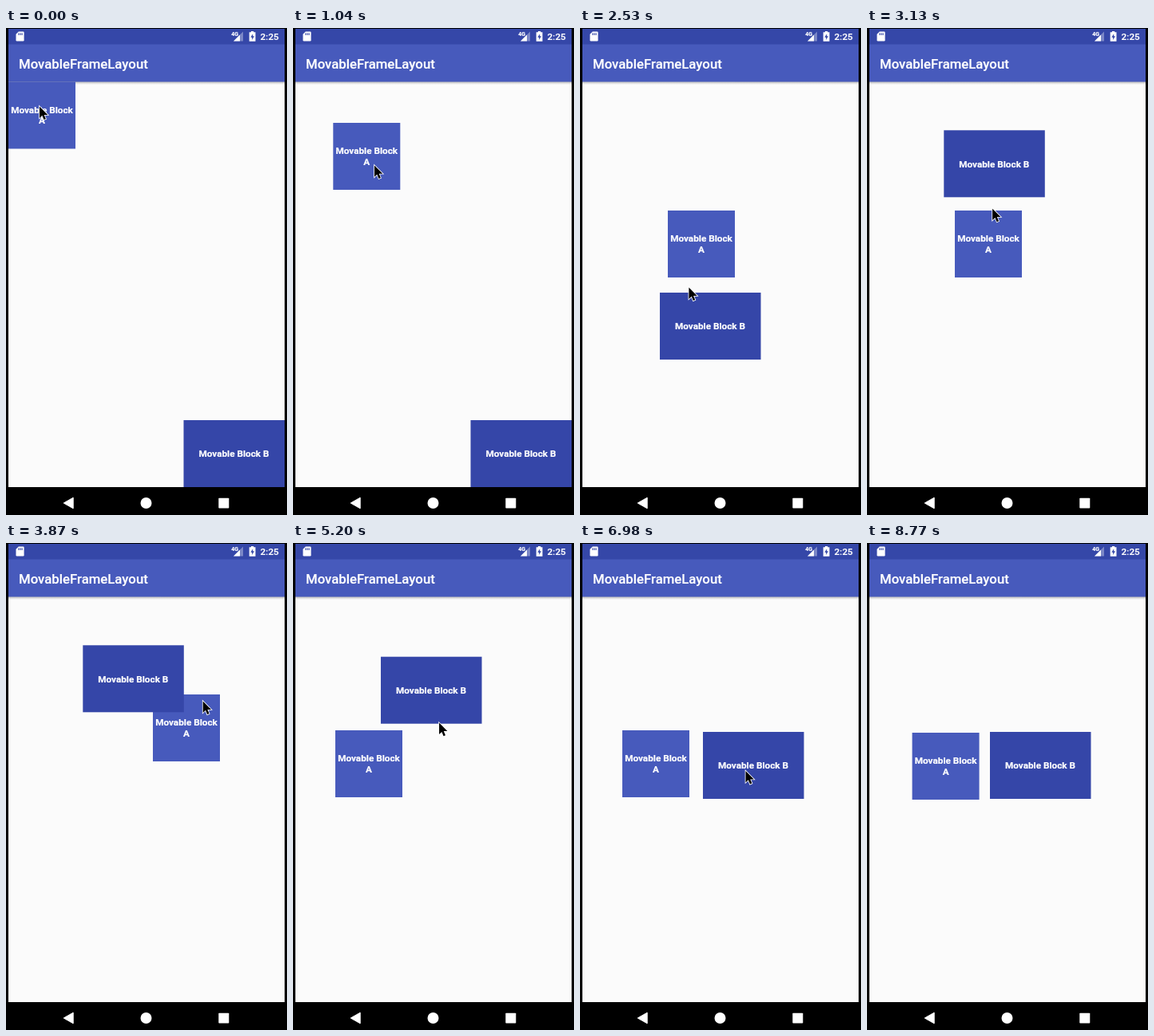
An HTML page that plays this animation: 352 by 611 pixels, repeating every 9.07 s.

```html
<!DOCTYPE html>
<html lang="en">
<head>
<meta charset="utf-8">
<title>MovableFrameLayout</title>
<style>
  html, body { margin: 0; width: 100%; height: 100%; overflow: hidden; background: #000; }
  svg { display: block; width: 352px; height: 611px; }
  text { font: 500 11.75px Roboto, sans-serif; fill: #fff; stroke: #fff; stroke-width: .2px; }
  .title { font-size: 16.75px; }
  .signal { font-size: 7px; font-weight: 700; }
  .label { font-weight: 700; text-anchor: middle; }
</style>
</head>
<body>
<svg viewBox="0 0 352 611">
  <defs>
    <linearGradient id="shade" x2="0" y2="1">
      <stop offset="0" stop-color="#000" stop-opacity=".28"/>
      <stop offset="1" stop-color="#000" stop-opacity="0"/>
    </linearGradient>
  </defs>

  <rect width="352" height="611"/>
  <rect x="3" y="1" width="346" height="575" fill="#fbfbfb"/>
  <rect x="3" y="67" width="346" height="4" fill="url(#shade)"/>
  <rect x="3" y="20" width="346" height="47.5" fill="#475abc"/>
  <rect x="3" y="1" width="346" height="19.5" fill="#3547a8"/>
  <text class="title" x="16" y="51">MovableFrameLayout</text>

  <g fill="#fff">
    <path d="M15.8 4.5H21.4Q22.6 4.5 22.6 5.7V15.3Q22.6 16.5 21.4 16.5H13.7Q12.5 16.5 12.5 15.3V7.8Z"/>
    <path d="M15.9 6.3v2.6M18 6.3v2.6M20.1 6.3v2.6" stroke="#3547a8" stroke-width="1.1"/>
    <text class="signal" x="282.3" y="10.3">4G</text>
    <path d="M297 4.5V16.5H285Z" opacity=".35"/>
    <path d="M293 8.5V16.5H285Z"/>
    <path d="M307 4h3.2v1.3h2.3v11.4h-7.8V5.3H307Z"/>
    <path d="M309.2 7.2l-2.8 4.6h1.8v3.2l2.8-4.7h-1.8Z" fill="#3547a8"/>
    <text x="318.6" y="15.3">2:25</text>
    <path d="M72.2 596L84.2 589.2V602.8Z" stroke="#fff" stroke-linejoin="round"/>
    <circle cx="175.5" cy="596" r="7"/>
    <rect x="266.3" y="589.8" width="13" height="12.8" rx=".8"/>
  </g>

  <g id="A">
    <rect width="84" height="84" fill="#475abc"/>
    <text class="label" x="42" y="39.2">Movable Block</text>
    <text class="label" x="42" y="52.8">A</text>
  </g>
  <g id="B">
    <rect width="126.5" height="84" fill="#3546a8"/>
    <text class="label" x="63" y="46.4">Movable Block B</text>
  </g>
  <path id="cursor" d="M0 0V14.4L3.3 11.3 5.5 16.6 7.9 15.6 5.7 10.4H10.3Z"
    stroke="#fff" stroke-width="1.6" paint-order="stroke"/>
</svg>
<script>
const LOOP = 9070, TICK = 148.65, LAST = 59;
const LEAD = 0.75;       // ticks by which the pointer runs ahead of its block
const GLIDE = 3;         // ticks the pointer takes to reach the next block
const EXIT = [330, 640];

const home = { A: [3, 67.5], B: [222.5, 492] };

// Each drag starts where its block lies; keys are [tick, x, y].
const drags = [
  { block: "A", begin: 0.8, grab: [39, 31], keys: [[5, 70, 167], [7, 50.3, 119], [10, 110, 229]] },
  { block: "B", begin: 13, grab: [44, 58], keys: [[16, 163, 438], [17, 100, 332], [20, 96.3, 128.3]] },
  { block: "A", begin: 22, grab: [64, 38], keys: [[26, 184, 190], [28, 160, 118], [32, 53, 235]] },
  { block: "B", begin: 33, grab: [69, 66], keys: [[35, 110, 142.7], [39, 132, 242], [41, 158, 230]] },
  { block: "B", begin: 43, grab: [53.5, 49], keys: [[45, 154, 237]] },
  { block: "A", begin: 50, grab: [60, 54], keys: [[52, 56.6, 238]] }
];

const rest = { ...home };
for (const drag of drags) {
  drag.keys.unshift([drag.begin, ...rest[drag.block]]);
  drag.end = drag.keys.at(-1)[0];
  rest[drag.block] = drag.keys.at(-1).slice(1);
}

const clamp = (v, lo, hi) => Math.min(hi, Math.max(lo, v));
const add = (a, b) => a.map((v, i) => v + b[i]);
const smooth = p => p * p * (3 - 2 * p);

// Smooth curve through the keys, at rest at both ends.
function along({ keys, begin, end }, tick) {
  const t = clamp(tick, begin, end);
  const i = Math.max(1, keys.findIndex(k => k[0] >= t));
  const a = keys[i - 1], b = keys[i], span = b[0] - a[0], p = (t - a[0]) / span;
  const slope = (k, axis) => {
    const before = keys[k - 1], after = keys[k + 1];
    return before && after ? (after[axis] - before[axis]) / (after[0] - before[0]) : 0;
  };
  return [1, 2].map(axis =>
    a[axis] + (b[axis] - a[axis]) * smooth(p) +
    span * p * (1 - p) * ((1 - p) * slope(i - 1, axis) - p * slope(i, axis)));
}

function blockAt(block, tick) {
  const drag = drags.filter(d => d.block === block && d.begin <= tick).at(-1);
  return drag ? along(drag, tick) : home[block];
}

const pointerOn = (drag, tick) => add(along(drag, tick), drag.grab);

function cursorAt(tick) {
  const i = Math.max(0, drags.filter(d => d.begin <= tick).length - 1);
  const drag = drags[i], next = drags[i + 1];
  const from = pointerOn(drag, tick + LEAD);
  if (tick <= drag.end) return from;
  const to = next ? pointerOn(next, next.begin) : EXIT;
  const stop = next ? next.begin : LAST;
  const go = next ? Math.max(drag.end, stop - GLIDE) : drag.end + 1;
  const p = smooth(clamp((tick - go) / (stop - go), 0, 1));
  return from.map((v, k) => v + (to[k] - v) * p);
}

function place(id, [x, y]) {
  document.getElementById(id).setAttribute("transform", `translate(${x} ${y})`);
}

const start = performance.now();

function draw() {
  const time = (performance.now() - start) % LOOP;
  const tick = Math.min(LAST, Math.floor((time + 6) / TICK));
  place("A", blockAt("A", tick));
  place("B", blockAt("B", tick));
  place("cursor", cursorAt(tick));
  requestAnimationFrame(draw);
}
draw();
</script>
</body>
</html>
```
